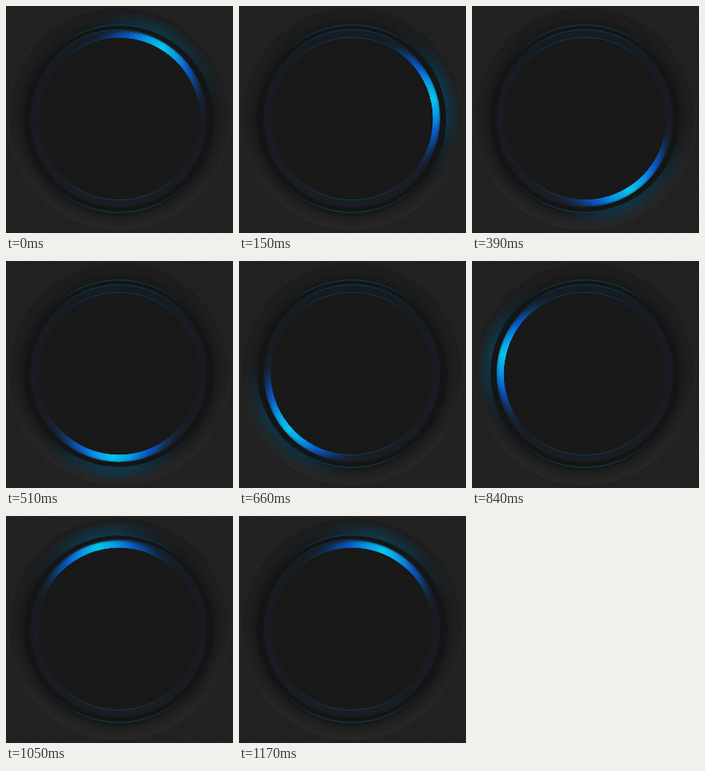
Write an HTML page with a canvas that moves like this. It is 284 px wide and 284 px high and loops after 1.2 s.

```html
<!DOCTYPE html>
<html lang="en">
<head>
<meta charset="utf-8">
<title>Rotating light ring</title>
<style>
html, body { margin: 0; width: 284px; height: 284px; overflow: hidden; background: #212121; }
canvas { display: block; }
</style>
</head>
<body>
<canvas id="stage" width="284" height="284"></canvas>
<script>
const SIZE = 284, CX = 141.2, CY = 141, LOOP = 1200, STEP = 30;
const RAD = Math.PI / 180;
const ctx = document.getElementById('stage').getContext('2d');
const base = document.createElement('canvas');
base.width = base.height = SIZE;

// Colour stops by angular distance from the brightest point
const INNER_LIGHT = [[0, '6,198,236,.6'], [12, '8,152,234,.5'], [24, '9,92,208,.32'],
                     [36, '9,70,150,.13'], [46, '10,56,110,.04'], [58, '10,48,90,0']];
const OUTER_LIGHT = [[0, '4,90,128,1'], [15, '4,86,122,.9'], [32, '4,76,110,.45'], [52, '4,62,94,0']];

function disc(c, r, fill, y = CY) {
  c.beginPath();
  c.arc(CX, y, r, 0, 2 * Math.PI);
  c.fillStyle = fill;
  c.fill();
}

function ring(c, r, width, stroke) {
  c.beginPath();
  c.arc(CX, CY, r, 0, 2 * Math.PI);
  c.lineWidth = width;
  c.strokeStyle = stroke;
  c.stroke();
}

function vertical(c, ...colours) {
  const g = c.createLinearGradient(0, 22, 0, 260);
  colours.forEach((colour, i) => g.addColorStop(i / (colours.length - 1), colour));
  return g;
}

// The gradient starts opposite the brightest point, so that point lies at 0.5
function light(stops, angle) {
  const g = ctx.createConicGradient((angle + 180) * RAD, CX, CY);
  for (const [offset, rgba] of stops) {
    g.addColorStop(0.5 - offset / 360, `rgba(${rgba})`);
    g.addColorStop(0.5 + offset / 360, `rgba(${rgba})`);
  }
  return g;
}

function grain(c) {
  let seed = 7;
  for (let y = 0; y < SIZE; y++) {
    for (let x = 0; x < SIZE; x++) {
      seed = (seed * 16807) % 2147483647;
      const n = seed / 2147483647 - 0.5;
      c.fillStyle = n > 0 ? `rgba(255,255,255,${n * 0.02})` : `rgba(0,0,0,${-n * 0.12})`;
      c.fillRect(x, y, 1, 1);
    }
  }
}

function drawBase() {
  const c = base.getContext('2d');
  c.fillStyle = '#222222';
  c.fillRect(0, 0, SIZE, SIZE);
  disc(c, 138.5, vertical(c, '#1d1d1d', '#202020', '#262626'));
  ring(c, 138.5, 1, vertical(c, '#202020', '#262626', '#2c2c2c'));

  const shadow = c.createRadialGradient(CX, CY + 3, 112, CX, CY + 3, 132);
  shadow.addColorStop(0, 'rgba(0,0,0,.5)');
  shadow.addColorStop(0.5, 'rgba(0,0,0,.16)');
  shadow.addColorStop(1, 'rgba(0,0,0,0)');
  disc(c, 132, shadow, CY + 3);

  disc(c, 117.5, '#151515');
  disc(c, 110.5, vertical(c, '#161c24', '#1a1b21', '#1b1d25'));
  disc(c, 101.5, '#191919');
  grain(c);

  ring(c, 117.3, 1, vertical(c, '#0a4a64', '#11191d', '#121314', '#121314', '#11191d', '#0a485e'));
  ring(c, 111.3, 1, vertical(c, '#0a4c68', '#11181c', '#131416', '#131416', '#14161a', '#16191e'));
  ring(c, 101.8, 1, vertical(c, '#0a4a62', '#15242c', '#191b20', '#191b20', '#15262e', '#0b4e66'));
}

function drawGlow(angle) {
  const glow = light(OUTER_LIGHT, angle);
  for (let r = 118; r < 135; r++) {
    ctx.globalAlpha = 0.55 * (1 - (r - 118) / 17);
    ring(ctx, r + 0.5, 1, glow);
  }
  ctx.globalAlpha = 1;
}

// Stacked discs build up towards the inner edge, which tapers the light there
function drawBand(angle) {
  const glow = light(INNER_LIGHT, angle);
  ctx.save();
  ctx.beginPath();
  ctx.arc(CX, CY, 110.7, 0, 2 * Math.PI);
  ctx.arc(CX, CY, 101.7, 0, 2 * Math.PI, true);
  ctx.clip('evenodd');
  for (let r = 111; r > 102; r--) disc(ctx, r, glow);
  ctx.restore();
}

function draw(now) {
  const t = Math.floor((now % LOOP) / STEP) * STEP;
  const angle = 31 + 360 * t / LOOP - 90;
  ctx.drawImage(base, 0, 0);
  drawGlow(angle);
  drawBand(angle);
  requestAnimationFrame(draw);
}

drawBase();
requestAnimationFrame(draw);
</script>
</body>
</html>
```
